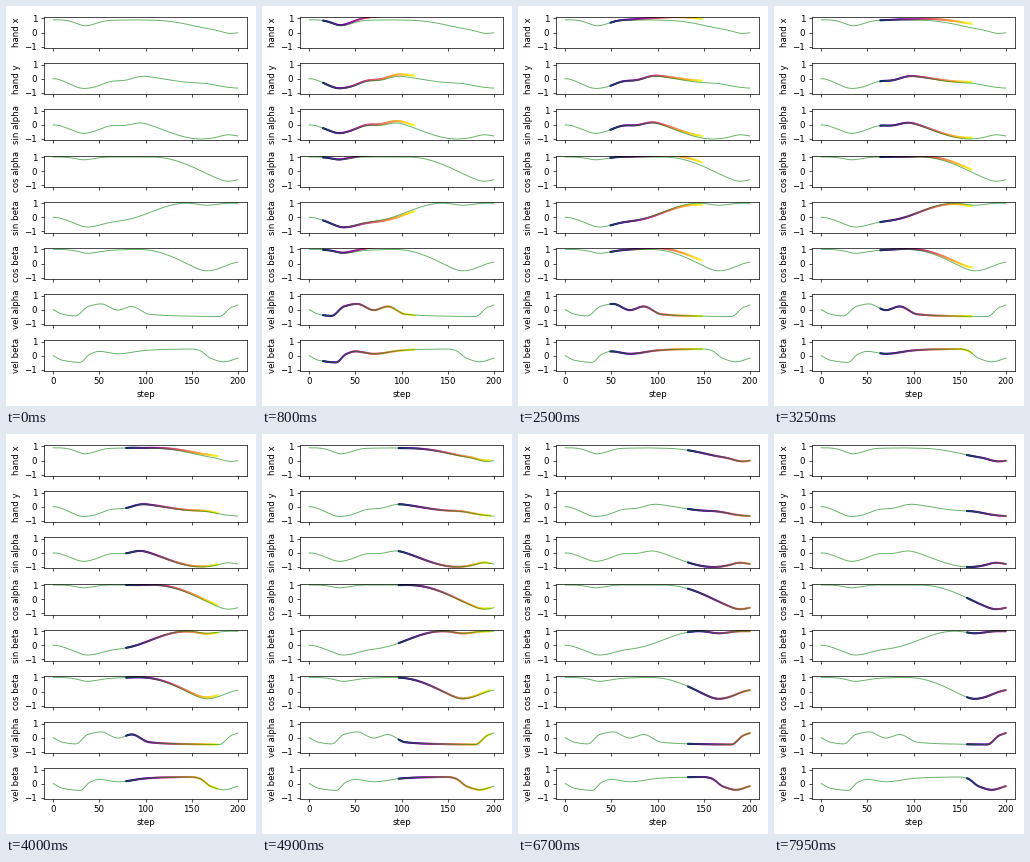
A matplotlib script for the animation above (8000 ms loop, 250 by 400 pixels).

```python
import numpy as np
import matplotlib.pyplot as plt
from matplotlib.animation import FuncAnimation

W, H, DPI = 250, 400, 62.5
FRAMES, INTERVAL = 160, 50
LAST, HORIZON = 200, 100
STEPS = np.arange(LAST + 1)

# Two-link arm: lengths, and angle turned per step at unit velocity
UPPER, LOWER, RATE = .5, .4, .066

# Turning points (step, velocity) of each joint
TURNS_ALPHA = [(0, 0), (10, -.32), (24, -.44), (38, .24), (52, .41),
               (70, -.03), (85, .23), (104, -.32), (130, -.43),
               (180, -.48), (193, .16), (200, .33)]
TURNS_BETA = [(0, .02), (10, -.31), (29, -.46), (40, .13), (50, .32),
              (70, .15), (100, .39), (120, .46), (150, .49),
              (158, .40), (171, -.18), (185, -.42), (200, -.16)]

# How far each forecast strays at the full horizon
DRIFT = {"hand x": .6, "hand y": .18, "sin alpha": .2,
         "cos alpha": .35, "sin beta": -.16, "cos beta": .45}


def smooth(points):
    """Monotone cubic curve through the points, one value per step."""
    x, y = np.array(points, float).T
    h, d = np.diff(x), np.diff(y) / np.diff(x)
    a, b = d[:-1], d[1:]
    turn = a * b <= 0
    inner = np.where(turn, 0, 2 * a * b / np.where(turn, 1, a + b))
    m = np.concatenate([d[:1], inner, d[-1:]])
    i = np.clip(np.searchsorted(x, STEPS, side="right") - 1, 0, len(h) - 1)
    t = (STEPS - x[i]) / h[i]
    ease = t * t * (3 - 2 * t)
    return (y[i] + (y[i + 1] - y[i]) * ease
            + h[i] * t * (1 - t) * ((1 - t) * m[i] - t * m[i + 1]))


def integrate(vel):
    return RATE * np.append(0, np.cumsum((vel[1:] + vel[:-1]) / 2))


vel_alpha, vel_beta = smooth(TURNS_ALPHA), smooth(TURNS_BETA)
alpha, beta = integrate(vel_alpha), integrate(vel_beta)
signals = {
    "hand x": UPPER * np.cos(alpha) + LOWER * np.cos(alpha + beta),
    "hand y": UPPER * np.sin(alpha) + LOWER * np.sin(alpha + beta),
    "sin alpha": np.sin(alpha),
    "cos alpha": np.cos(alpha),
    "sin beta": np.sin(beta),
    "cos beta": np.cos(beta),
    "vel alpha": vel_alpha,
    "vel beta": vel_beta,
}


def forecast(name, start):
    """True values plus a drift that grows with lead and fades with start."""
    x = STEPS[start:start + HORIZON]
    lead = (x - start) / (HORIZON - 1)
    fade = 1 / (1 + np.exp((start - 64) / 16))
    drift = DRIFT.get(name, 0) * fade * lead ** 1.5
    return np.column_stack([x, signals[name][x] + drift])


plt.rcParams.update({"font.family": "DejaVu Sans", "font.size": 10})
fig = plt.figure(figsize=(W / DPI, H / DPI), dpi=DPI, facecolor="white")

LEFT, RIGHT, TOP, HEIGHT, PITCH = 38, 241, 11, 31, 46.2
dots = {}
for k, (name, values) in enumerate(signals.items()):
    bottom = H - TOP - k * PITCH - HEIGHT
    ax = fig.add_axes([LEFT / W, bottom / H, (RIGHT - LEFT) / W, HEIGHT / H])
    ax.plot(STEPS, values, color="g", alpha=.6, lw=1.1)
    dots[name] = ax.scatter([], [], c=[], s=6, lw=0, cmap="plasma",
                            vmin=0, vmax=HORIZON - 1, zorder=1)
    ax.set(xlim=(-10, 210), ylim=(-1.1, 1.1), ylabel=name,
           xticks=range(0, 201, 50), yticks=[-1, 0, 1])
    ax.tick_params(axis="y", pad=4.2)
    ax.tick_params(labelbottom=k == len(signals) - 1)
ax.set_xlabel("step")


def update(frame):
    for name, dot in dots.items():
        pts = forecast(name, frame - 1) if frame else np.empty((0, 2))
        dot.set_offsets(pts)
        dot.set_array(np.arange(len(pts), dtype=float))
    return list(dots.values())


anim = FuncAnimation(fig, update, frames=FRAMES, interval=INTERVAL,
                     repeat=True, repeat_delay=0)
plt.show()
```
